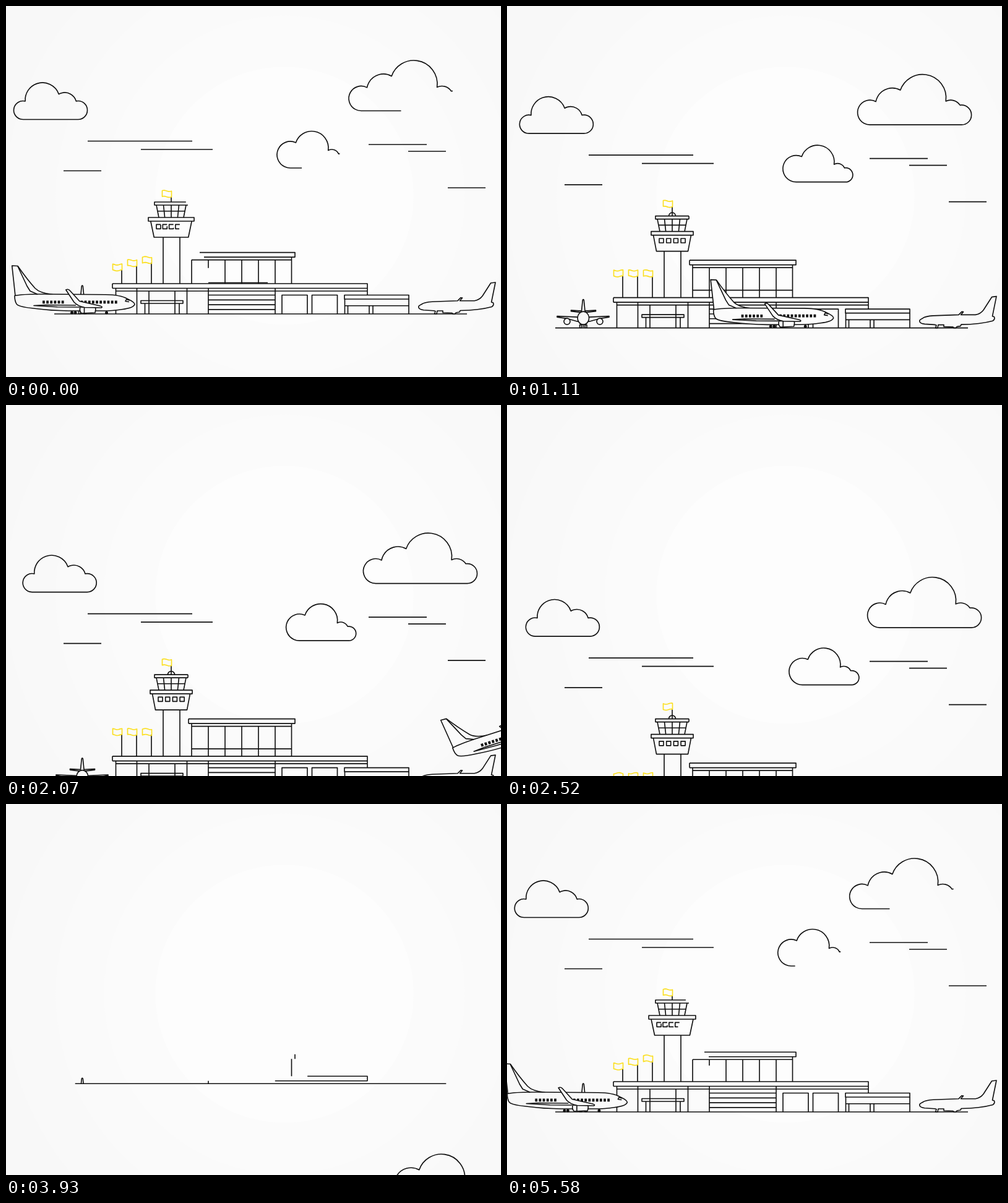
Animation, 800 px wide and 600 px high, one loop 5610 ms. Source, as an HTML page with a canvas:

```html
<!DOCTYPE html>
<html lang="en">
<head>
<meta charset="utf-8">
<title>Airport</title>
<style>
html, body { margin: 0; width: 100%; height: 100%; overflow: hidden; }
canvas {
  display: block; width: 800px; height: 600px;
  background: radial-gradient(circle at 450px 307px,
    #fdfdfd 208px, #fbfbfb 209px 291px, #fafafa 292px 369px,
    #f9f9f9 370px 450px, #f8f8f8 451px);
}
</style>
</head>
<body>
<canvas id="stage" width="800" height="600"></canvas>
<script>
const ctx = document.getElementById('stage').getContext('2d');
const LOOP = 5610, DROP = 524, BASE = 498;
const INK = '#111', YELLOW = '#fbdf1e', WEIGHT = 1.65;

const clamp = v => Math.max(0, Math.min(1, v));
const mix = (a, b, u) => a + (b - a) * u;
const lin = (t, a, b) => clamp((t - a) / (b - a));
const smooth = (t, a, b) => { const u = lin(t, a, b); return u * u * (3 - 2 * u); };
// Falls from 1 to 0, slowing down towards the end
const rest = (t, a, b, power = 2) => (1 - lin(t, a, b)) ** power;

// Bezier easing with level handles at x1 and x2
function ease(u, x1, x2) {
  let lo = 0, hi = 1;
  for (let i = 0; i < 24; i++) {
    const s = (lo + hi) / 2, w = 1 - s;
    if (3 * x1 * s * w * w + 3 * x2 * s * s * w + s ** 3 < u) lo = s;
    else hi = s;
  }
  return lo * lo * (3 - 2 * lo);
}
const camera = t => DROP * ease(lin(t, 350, 4358), .533, .828);

function line(...p) {
  ctx.beginPath();
  for (let i = 0; i < p.length; i += 2) ctx.lineTo(p[i], p[i + 1]);
  ctx.stroke();
}
function hline(x1, x2, y, p = 1) { if (p > 0) line(x1, y, mix(x1, x2, p), y); }
function vline(x, y1, y2, p = 1) { if (p > 0) line(x, y1, x, mix(y1, y2, p)); }
function grow(x1, x2, y, p) {
  const c = (x1 + x2) / 2;
  if (p > 0) line(mix(c, x1, p), y, mix(c, x2, p), y);
}
function trim(path, len, p) {
  if (p <= 0) return;
  if (p < 1) ctx.setLineDash([len * p, len * 2]);
  ctx.stroke(path);
  ctx.setLineDash([]);
}
// Clears what lies behind, then outlines
function solid(path) {
  ctx.globalCompositeOperation = 'destination-out';
  ctx.fill(path);
  ctx.globalCompositeOperation = 'source-over';
  ctx.stroke(path);
}
function disc(x, y, r) {
  const path = new Path2D();
  path.arc(x, y, r, 0, 7);
  return path;
}

// Outline of overlapping circles on a flat base, given from right to left
function makeCloud(...circles) {
  const path = new Path2D(), n = circles.length;
  let from = -Math.PI / 2, len = 0;
  circles.forEach(([x, y, r], i) => {
    let to = Math.PI / 2 - 2 * Math.PI, next = 0;
    if (i < n - 1) {
      const [x2, y2, r2] = circles[i + 1];
      const dx = x2 - x, dy = y2 - y, d = Math.hypot(dx, dy);
      const a = (r * r - r2 * r2 + d * d) / (2 * d), h = Math.sqrt(r * r - a * a);
      const px = x + (dx * a - dy * h) / d, py = y + (dy * a + dx * h) / d;
      to = Math.atan2(py - y, px - x);
      next = Math.atan2(py - y2, px - x2);
    }
    path.arc(x, y, r, from, to, true);
    let turn = (from - to) % (2 * Math.PI);
    if (turn < 0) turn += 2 * Math.PI;
    len += r * turn;
    from = next;
  });
  const [x, y, r] = circles[0];
  path.lineTo(x, y + r);
  path.arc(x, y, r, Math.PI / 2, -Math.PI / 2, true);
  len += x - circles[n - 1][0] + r * Math.PI;
  return { path, len };
}
const leftCloud = makeCloud([116.5, 168.5, 15], [95, 159, 19], [59, 152, 28], [27.5, 168.5, 15]);
const bigCloud = makeCloud([722, 153.5, 16], [704.5, 147.5, 18], [659, 126, 38], [610, 137, 27], [574, 149.5, 20]);
const smallCloud = makeCloud([539.5, 250.5, 11.5], [526.5, 244, 12], [494, 229.5, 27], [459.5, 240.5, 21.5]);

function drawCloud(cloud, x, p) {
  ctx.save();
  ctx.translate(x, -BASE);
  trim(cloud.path, cloud.len, p);
  ctx.restore();
}

function sky(T) {
  const late = t => lin(t, -790, 190) ** 1.6;
  drawCloud(leftCloud, T * .0071, smooth(T, -1380, -560));
  drawCloud(bigCloud, T * .01135, late(T));
  drawCloud(smallCloud, T * .0071, late(T - 30));
  [[586, 680, -274], [132, 301, -279.5], [218, 334, -266], [650, 711, -263],
    [93, 154, -231.5], [714, 775, -204]].forEach(([a, b, y], i) =>
    grow(a, b, y, smooth(T - i * 60, -1640, -1140)));
}

function flag(x, y, T) {
  const wave = u => Math.sin(u * 5.6 + T * .006 + x) * .9;
  ctx.strokeStyle = YELLOW;
  ctx.beginPath();
  for (let u = 0; u <= 1.001; u += .1) ctx.lineTo(x - 15 * (1 - u), y + wave(u));
  for (let u = 1; u >= -.001; u -= .1) ctx.lineTo(x - 15 * (1 - u), y + 9.5 + wave(u));
  ctx.closePath();
  ctx.stroke();
  ctx.strokeStyle = INK;
}

function tower(T) {
  const c = 267, e = 3 * rest(T, -157, 214), s = 1 + .088 * e;
  ctx.save();
  ctx.translate(0, 220 * (1 - smooth(T, -1500, -480)));
  vline(254, 0, -124);
  vline(281, 0, -124);
  line(c - 30.5 * s, -150, c - 25.5 * s, -124, c + 25.5 * s, -124, c + 30.5 * s, -150);
  ctx.strokeRect(c - 34 * s, -156, 68 * s, 6);
  for (let i = 0; i < 4; i++) {
    const x = 246 + 11.7 * i - e * (3 + 1.4 * i);
    trim(new Path2D(`M${x + 7} -144.7h-7v7h7z`), 28, lin(T - 50 * i, -560, 10));
  }
  for (const k of [-1, -.52, 0, .52, 1]) line(c + 24 * k, -176, c + 20 * k, -156);
  hline(245, 289, -166.3);
  const p = lin(T, -800, 50);
  line(294, -176, 240, -176, 240, -181, mix(240, 294, p), -181);
  if (p === 1) vline(294, -181, -176);
  const lift = 7.5 * rest(T, -30, 280, 1.3);
  vline(c, -181, -196 + lift);
  const r = 5.5 * smooth(T, 30, 300);
  ctx.beginPath();
  ctx.arc(c, -181, r, Math.PI, 0);
  ctx.stroke();
  flag(267.5, -205.5 + lift, T);
  ctx.restore();
}

function upperHall(T) {
  ctx.save();
  ctx.translate(0, 62 * rest(T, -365, 247));
  const top = mix(295, 467, rest(T, -406, 194));
  const low = Math.min(467, top + 7 * (1 - lin(T, 0, 180)));
  line(top, -109.5, 467, -109.5, 467, -102, low, -102);
  if (T >= 194) vline(295, -109.5, -102);
  hline(461.5, 300, -97.5, lin(T, -600, -120));
  vline(461.5, -102, 20);
  vline(300, T < 194 ? -97.5 : -102, 20, lin(T, -160, -60));
  for (let i = 0; i < 4; i++) vline(435 - 27 * i, -97.5, 20, smooth(T - i * 70, -560, -280));
  vline(327, -97.5, -49, lin(T, -120, 320));
  ctx.restore();
  if (T > -25) {
    const up = smooth(T, 0, 320);
    hline(mix(327, 300, up), mix(423, 461.5, lin(T, 0, 1060)), mix(-50.5, -61, up));
  }
}

function shelterAndShed(p) {
  vline(231, 0, -37, p(2));
  vline(273, 0, -37, p(3));
  vline(224.5, 0, -17, p(1));
  vline(280, 0, -17, p(1));
  trim(new Path2D('M218 -21.5h68v4.5h-68z'), 145, p(3));
  trim(new Path2D('M547 -30.5h104v6.5h-104z'), 221, p(2));
  hline(547, 651, -13.3, p(4));
  for (const x of [547.5, 651]) vline(x, 0, -24, p(1));
  for (const x of [552.5, 587, 593]) vline(x, 0, -13.3, p(3));
}

function terminal(T) {
  if (T < -1990) return;
  const roof = -49 * smooth(T, -1990, -1030);
  ctx.save();
  ctx.beginPath();
  ctx.rect(0, -700, 800, 700 + roof);
  ctx.clip();
  for (let i = 0; i < 3; i++) {
    const x = 187 + 24 * i, d = 110 * rest(T + 150 * i, -1165, 370, 1.5);
    vline(x, 0, -84 + d);
    flag(x + .5, -93 + d, T);
  }
  tower(T);
  upperHall(T);
  ctx.restore();

  const low = lin(T, -1990, -1134), top = lin(T, -1880, -1029);
  line(mix(584, 172, low), roof + 7.5, 584, roof + 7.5, 584, roof, mix(584, 172, top), roof);
  if (top === 1) vline(172, roof, roof + 7.5);
  [327, 435, 292.5, 211.5, 177.5].forEach((x, i) => {
    const start = i ? -1670 + i * 50 : -2000;
    if (T > start) line(x, 0, x, Math.max(Math.min(0, roof + 7.5), -41.5 * smooth(T, start, start + 500)));
  });
  const p = k => smooth(T - k * 50, -1420, -950);
  hline(584, 177.5, -37, p(2));
  vline(584, -30.5, -41.5, p(2));
  for (let i = 0; i < 4; i++) hline(327, 435, -30.5 + 7.8 * i, p(i));
  for (const x of [446, 494.5]) trim(new Path2D(`M${x} 0v-30.5h41v30.5`), 102, p(1));
  shelterAndShed(p);
}

const frontWings = new Path2D('M114 -10.5L98 -15L81 -17.5V-19L115 -17.5H132L165 -19V-17.5L149 -15L133 -10.5Z');
const frontTail = new Path2D('M120 -25L103.5 -27V-28.5L120.5 -27.5L122.3 -45Q123.3 -47 124.3 -45L126 -27.5L143.5 -28.5V-27L127 -25Z');

function frontPlane(T) {
  const hidden = 46 * (1 - smooth(T, -1890, -1150));
  if (hidden === 46) return;
  ctx.save();
  ctx.beginPath();
  ctx.rect(70, -80, 110, 80.5);
  ctx.clip();
  ctx.translate(0, hidden);
  solid(frontWings);
  for (const x of [97, 150]) solid(disc(x, -10.5, 5));
  solid(frontTail);
  const body = new Path2D();
  body.ellipse(123.3, -16, 9.3, 10.5, 0, 0, 7);
  solid(body);
  for (const x of [117.5, 126]) ctx.strokeRect(x, -5, 3, 5);
  vline(123.3, -5.5, -1);
  ctx.restore();
}

const parked = new Path2D('M730 -21.3L689 -19.8Q676 -19 671.5 -15.5Q666 -13 666.8 -11'
  + 'Q667 -7.5 675 -6.3L691 -5.3L694 -4.5L692.5 0H696L697 -5L706 -5V-2L721 -1.5L722 0H726L727 -2'
  + 'L733 -3L734 -5.5Q765 -6 785 -11.5Q789 -14 787.5 -18L784.5 -19L791 -51L783.5 -50'
  + 'L770 -29Q765 -22.5 757 -21.3L733.5 -21.3L737.5 -26L735 -26.3L730 -21.3Z');

function rightPlane(T) {
  const p = smooth(T, -1550, -520);
  if (p < 1) trim(parked, 368, p);
  else solid(parked);
}

const fin = new Path2D('M6 -29L.7 -78L10 -77.5Q25 -56 38 -41.5Q46 -33.5 66 -31.5L30 -28Z');
const hull = new Path2D('M5 -29.5Q18 -32.2 50 -32L152 -31.3Q176 -31 187 -24.5Q199 -19 199 -15.5'
  + 'Q197 -9.5 178 -7.3Q164 -5 145 -5H92Q62 -5.5 40 -8.5Q13 -11 8.5 -15.5Q5 -20 5 -29.5Z');
const wing = new Path2D('M87.8 -39Q92 -41 94.5 -37.5L110 -20.5L143 -13Q148 -11.5 145 -10L118 -10.5Q107 -12.5 101 -19Z');
const engine = new Path2D('M111 -11H135L136 -8L135 -2L113 -1Q109 -5 111 -11Z');

// Rolls in, slows, speeds up again, then pitches up and climbs
function jet(T) {
  const run = T - 660;
  const x = T < 30 ? 9 + .455 * T : 183 + .295 * run + 6.4e-5 * run * run;
  if (x < -210 || x > 900) return;
  ctx.save();
  ctx.translate(x, -4.79e-5 * Math.max(0, T - 1241) ** 2);
  ctx.rotate(-.0186 * Math.max(0, T - 1100) * Math.PI / 180);
  ctx.fillStyle = INK;
  for (const w of [97.5, 103, 153.5]) {
    ctx.fill(disc(w, -2, 2.5));
    vline(w, -6, -2);
  }
  solid(fin);
  solid(hull);
  line(10, -77, 25, -45, 30, -37, 42, -31.8);
  line(110, -11, 74, -11.3, 36, -13.5, 55, -14.5, 104, -14);
  for (let i = 0; i < 20; i++) {
    if (i < 6 || i > 8) ctx.fillRect(50 + i * 6.15, -21.5, 3.8, 4.8);
  }
  line(191, -22, 185.5, -23.5, 184, -20.5, 190, -19.5);
  solid(engine);
  vline(117.5, -10.5, -1.5);
  solid(wing);
  ctx.restore();
}

function scene(T, ground) {
  ctx.save();
  ctx.translate(0, ground);
  sky(T);
  terminal(T);
  frontPlane(T);
  rightPlane(T);
  grow(78, 745, 0, lin(T, -2747, -1560));
  jet(T);
  ctx.restore();
}

function draw(now) {
  const t = now % LOOP, y = BASE + camera(t);
  ctx.clearRect(0, 0, 800, 600);
  ctx.strokeStyle = INK;
  ctx.lineWidth = WEIGHT;
  ctx.lineJoin = 'round';
  scene(t, y);
  scene(t - LOOP, y - DROP);
}

let begin = null;
function tick(now) {
  if (begin === null) begin = now;
  draw(now - begin);
  requestAnimationFrame(tick);
}
draw(0);
requestAnimationFrame(tick);
</script>
</body>
</html>
```
